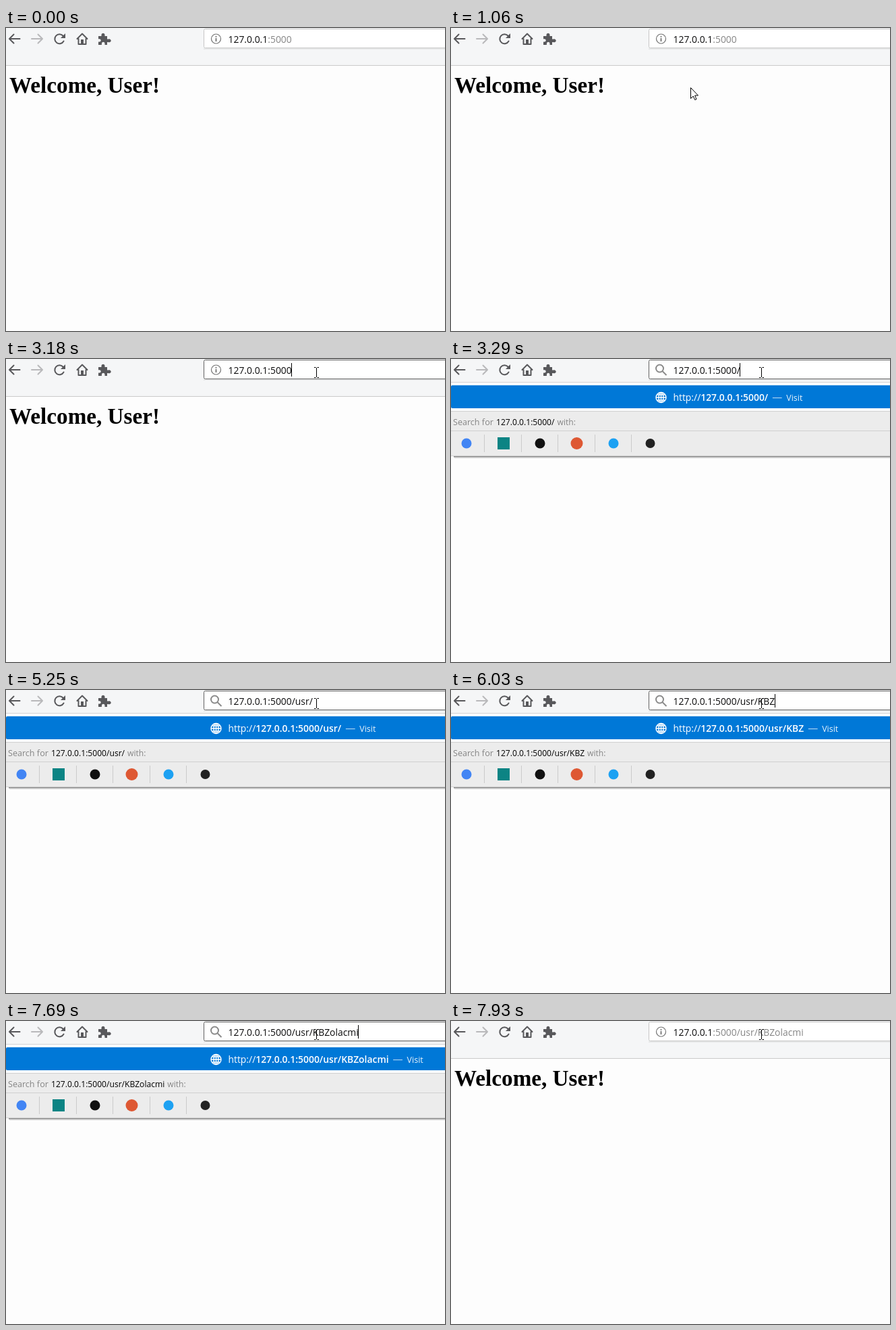
An HTML page that plays this animation: 651 by 449 pixels, repeating every 7990 ms.

```html
<!DOCTYPE html>
<html lang="en">
<head>
<meta charset="utf-8">
<title>Address bar</title>
<style>
  html, body { margin: 0; width: 100%; height: 100%; overflow: hidden; background: #fdfdfd; }
  svg { display: block; }
  text { font-family: "Open Sans", "Noto Sans", sans-serif; white-space: pre; }
  .bar { font-size: 13.9px; }
  .small { font-size: 12.1px; }
  .dim { fill: #858585; }
  .line { fill: none; stroke: #58585b; stroke-width: 2; stroke-linecap: round; stroke-linejoin: round; }
  h1 { margin: 0; }
</style>
</head>
<body>
<svg width="651" height="449" viewBox="0 0 651 449">
  <rect width="651" height="449" fill="#fdfdfd"/>
  <rect width="651" height="55" fill="#f5f6f7"/>
  <rect y="55" width="651" height="1" fill="#cacaca"/>
  <text x="5" y="96" font-size="33.2" font-weight="700" style="font-family:'Liberation Serif',serif">Welcome, User!</text>

  <!-- toolbar buttons -->
  <path class="line" d="M20.500 16H5.500M11.500 9.500L5 16L11.500 22.500"/>
  <path class="line" style="stroke:#b9b9bb" d="M38 16H53.500M47.500 9.500L54 16L47.500 22.500"/>
  <path class="line" d="M85.500 19.500A7 7 0 1 1 84.500 11.500"/>
  <path d="M88 8V15H81Z" fill="#58585b"/>
  <path class="line" d="M105.500 16L113 8.500L120.500 16M107.500 16V24H118.500V16"/>
  <rect x="111" y="17" width="4" height="7" fill="#58585b"/>
  <path fill="#58585b" d="M137 12H141.500V10.500A2.500 2.700 0 1 1 146.500 10.500V12H150V16.500H152A2.600 2.500 0 1 1 152 21H150V25H146.500V23A2.300 2.300 0 0 0 141.900 23V25H137V20.500H139A2.200 2.200 0 0 0 139 16.200H137Z"/>

  <!-- suggestions -->
  <g id="popup">
    <rect y="34" width="651" height="1" fill="#d3d3d5"/>
    <rect y="35" width="651" height="109" fill="#fdfdfd"/>
    <rect y="39" width="655" height="34" rx="2" fill="#0078d7"/>
    <g fill="none" stroke="#fff" stroke-width="1.4">
      <circle cx="311.500" cy="57" r="7.500"/>
      <ellipse cx="311.500" cy="57" rx="3.500" ry="7.500"/>
      <path d="M311.500 49.500V64.500M304 57H319M305.500 53H317.500M305.500 61H317.500"/>
    </g>
    <text class="bar" x="329.500" y="62" fill="#fff">http://<tspan id="visitUrl" font-weight="600"></tspan><tspan dx="6" font-size="15" fill="#b5d8f3">—</tspan><tspan dx="6" font-size="12.500" fill="#e8f3fb">Visit</tspan></text>
    <rect y="77" width="651" height="67" fill="#ececec"/>
    <rect y="77" width="651" height="1" fill="#d0d0d0"/>
    <rect y="106" width="651" height="1" fill="#cfcfcf"/>
    <text class="dim" x="3" y="98" font-size="12.600">Search for</text>
    <text class="small" x="67" y="98"><tspan id="queryUrl"></tspan><tspan class="dim" dx="4">with:</tspan></text>
    <path d="M49.500 112V138M104.500 112V138M158.500 112V138M213.500 112V138M267.500 112V138" stroke="#cbcbcb"/>
    <circle cx="23" cy="125" r="7.500" fill="#4285f4"/>
    <rect x="69" y="116" width="18" height="18" fill="#0c8484"/>
    <circle cx="132" cy="125" r="7.500" fill="#111"/>
    <circle cx="186.500" cy="125" r="9" fill="#de5833"/>
    <circle cx="241" cy="125" r="7.500" fill="#1da1f2"/>
    <circle cx="295.500" cy="125" r="7" fill="#222"/>
    <rect y="143" width="651" height="1" fill="#d5d5d5"/>
    <rect x="4" y="144" width="647" height="1.500" fill="#868686"/>
    <rect x="5" y="145.500" width="646" height="1.500" fill="#d2d2d2"/>
  </g>

  <!-- address field -->
  <rect x="293" y="30" width="360" height="2" fill="#000" opacity=".06"/>
  <rect id="field" x="293.500" y="1.500" width="370" height="28" rx="2" fill="#fff"/>
  <g id="info" fill="none" stroke="#737373" stroke-width="1.200">
    <circle cx="311.500" cy="16" r="7"/>
    <path d="M311.500 15V20M311.500 12V13.700" stroke-width="1.800"/>
  </g>
  <g id="lens" fill="none" stroke="#8a8a8a" stroke-width="2">
    <circle cx="309.500" cy="14" r="5.500"/>
    <path d="M313.500 18L319.500 24"/>
  </g>
  <rect id="selection" x="329" y="6" width="95" height="20" fill="#0078d7"/>
  <text id="url" class="bar" x="329.500" y="22"><tspan>127.0.0.1</tspan><tspan id="tail"></tspan></text>
  <rect id="caret" y="6" width="1" height="20"/>

  <!-- pointers, both with their origin at the hot spot -->
  <path id="arrow" d="M.5 .5V16.500L4.200 13L6.700 18.500L9 17.500L6.600 12H11.500Z" fill="#fff" stroke="#000"/>
  <path id="beam" d="M-3 -7.500H-.5M1.500 -7.500H4M.5 -7V7M-3 7.500H-.5M1.500 7.500H4" fill="none" stroke="#000"/>
</svg>
<script>
const LOOP = 7990;
const HOST = "127.0.0.1", PORT = ":5000";
const PATH = "/usr/KBZolacmi";

// time, mode, typed characters, caret, characters shown in the suggestions
const steps = [
  [0, "idle", 0, 0],
  [1600, "focus", 0, 1],
  [1760, "select", 0, 0],
  [2560, "focus", 0, 1],
  [2680, "focus", 0, 0],
  [3180, "focus", 0, 1],
  [3290, "suggest", 1, 1],
  [3660, "suggest", 2, 1, 1],
  [3720, "suggest", 2, 1],
  [3900, "suggest", 3, 1],
  [4020, "suggest", 4, 0],
  [4200, "suggest", 4, 1],
  [4690, "suggest", 4, 0],
  [4880, "suggest", 5, 1],
  [5250, "suggest", 5, 0],
  [5560, "suggest", 6, 1],
  [5740, "suggest", 7, 0, 6],
  [5790, "suggest", 7, 0],
  [5850, "suggest", 7, 1],
  [6030, "suggest", 8, 1],
  [6280, "suggest", 9, 1, 8],
  [6340, "suggest", 9, 1],
  [6650, "suggest", 10, 1],
  [6740, "suggest", 11, 1],
  [6830, "suggest", 12, 0],
  [7010, "suggest", 13, 1],
  [7320, "suggest", 13, 0],
  [7690, "suggest", 14, 1],
  [7870, "focus", 14, 0],
  [7930, "idle", 14, 0]
];

// time, shape, x, y
const moves = [
  [0, "none", 0, 0],
  [550, "arrow", 426, 318],
  [600, "arrow", 452, 235],
  [640, "arrow", 475, 168],
  [950, "arrow", 425, 128],
  [1010, "arrow", 355, 88],
  [1070, "arrow", 308, 52],
  [1120, "arrow", 295, 32],
  [1180, "beam", 345, 22],
  [1240, "beam", 415, 20],
  [1300, "beam", 460, 20]
];

const ui = {};
document.querySelectorAll("[id]").forEach(el => ui[el.id] = el);

const at = (table, t) => table.findLast(row => row[0] <= t);
const show = (el, on) => el.style.display = on ? "" : "none";

function drawField([, mode, typed, caret, listed = typed]) {
  const suggest = mode === "suggest", idle = mode === "idle", selected = mode === "select";
  show(ui.popup, suggest);
  show(ui.lens, suggest);
  show(ui.info, !suggest);
  show(ui.selection, selected);
  show(ui.caret, caret);
  ui.field.setAttribute("stroke", idle ? "#c6c6c6" : "#626262");
  ui.url.setAttribute("fill", selected ? "#fff" : "#0c0c0d");
  ui.tail.setAttribute("class", idle ? "dim" : "");
  ui.tail.textContent = PORT + PATH.slice(0, typed);
  ui.visitUrl.textContent = ui.queryUrl.textContent = HOST + PORT + PATH.slice(0, listed);
  ui.caret.setAttribute("x", Math.floor(329.5 + ui.url.getComputedTextLength()));
}

function drawPointer([, shape, x, y]) {
  for (const name of ["arrow", "beam"]) {
    show(ui[name], name === shape);
    ui[name].setAttribute("transform", `translate(${x} ${y})`);
  }
}

let lastStep, lastMove;
function tick() {
  const t = performance.now() % LOOP;
  const step = at(steps, t), move = at(moves, t);
  if (step !== lastStep) drawField(lastStep = step);
  if (move !== lastMove) drawPointer(lastMove = move);
  requestAnimationFrame(tick);
}
tick();
</script>
</body>
</html>
```
